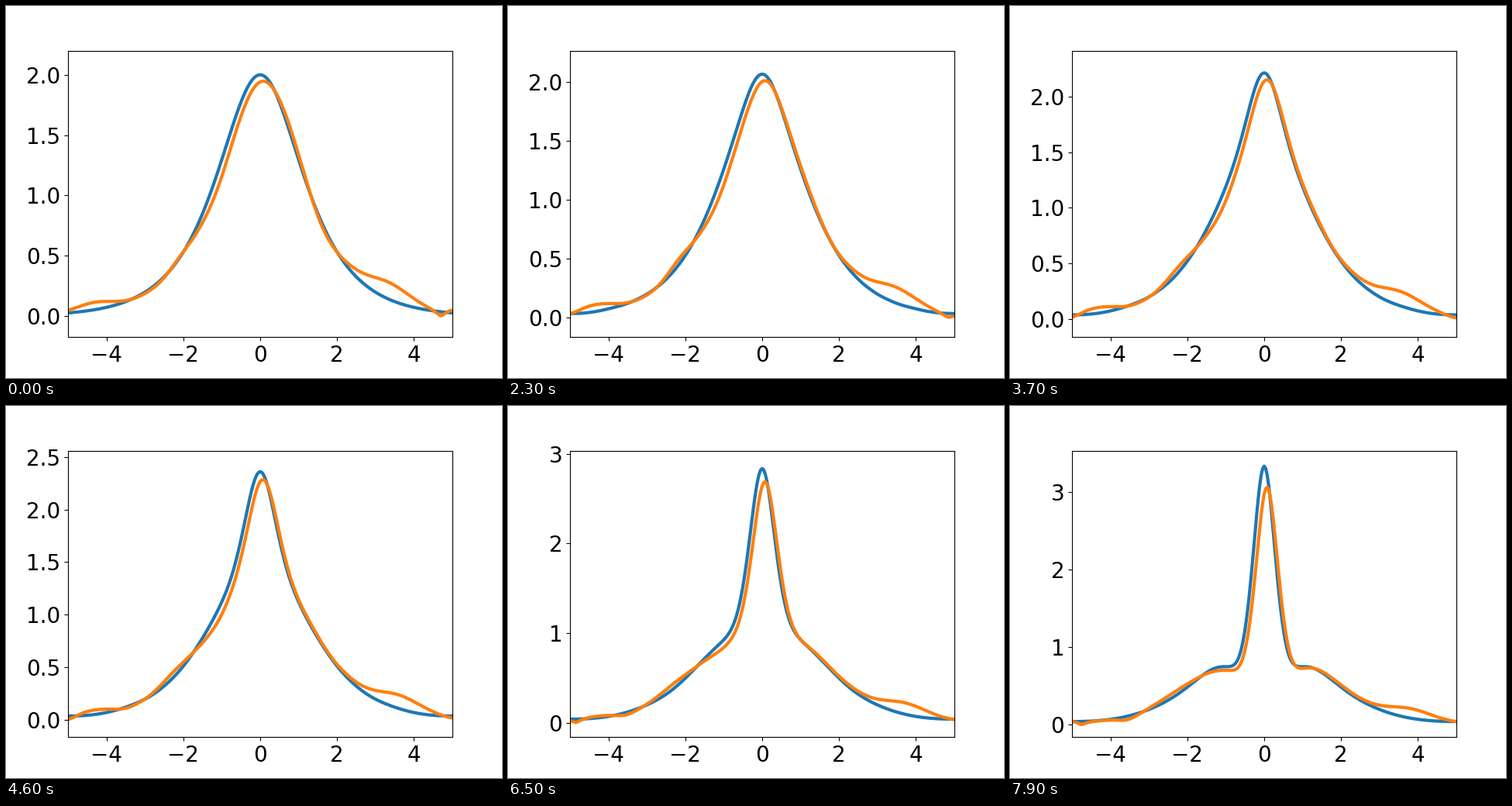
Recreate the animation shown at these times as a matplotlib script. Size 640 px wide and 480 px high, loop 8000 ms.

```python
import numpy as np
import matplotlib.pyplot as plt
from matplotlib.animation import FuncAnimation

plt.rcParams["font.family"] = "DejaVu Sans"
plt.rcParams["font.size"] = 20

FRAMES, HOLD = 80, 4
LAST = FRAMES - 1 - HOLD
DT = np.pi / 400
N = 256
x = np.linspace(-5, 5, N + 1)[:-1]


def simulate(steps, sub=10):
    """|h| for i h_t + h_xx / 2 + |h|^2 h = 0, periodic, by split steps."""
    dt = DT / sub
    wave = 2 * np.pi * np.fft.fftfreq(N, 10 / N)
    drift = np.exp(-0.5j * wave**2 * dt)
    h = 2 / np.cosh(x) + 0j
    rows = [np.abs(h)]
    for _ in range(steps):
        for _ in range(sub):
            h = h * np.exp(0.5j * dt * np.abs(h) ** 2)
            h = np.fft.ifft(drift * np.fft.fft(h))
            h = h * np.exp(0.5j * dt * np.abs(h) ** 2)
        rows.append(np.abs(h))
    return np.array(rows)


def breather(x, t):
    """Closed form of the two-soliton amplitude on the open line."""
    top = np.cosh(3 * x) + 3 * np.exp(4j * t) * np.cosh(x)
    return 4 * np.abs(top) / (np.cosh(4 * x) + 4 * np.cosh(2 * x) + 3 * np.cos(4 * t))


def bump(centre, width, height):
    return height * np.exp(-(((x - centre) / width) ** 2))


def fitted(step):
    """Imperfect fit: the wave shifted right, flattened, with drifting ripples."""
    p = step / LAST
    early = np.exp(-12 * p)
    y = breather(x - 0.07, step * DT)
    y *= 1 - 0.076 * p**3 * np.exp(-2 * x**2)
    y -= (0.055 - 0.035 * p**2) * np.exp(-((x / 1.4) ** 4))

    # left tail and flank
    y += bump(-5, 0.3, -0.065 * p)
    y += bump(-4.3, 0.7, 0.065 * (1 - p**2))
    y += bump(-3.55, 0.35, -0.045 * p**2)
    y += bump(-2.1 - 0.2 * p, 0.4 + 0.35 * p, 0.08 - 0.04 * early)
    y += bump(-1.1, 0.4, -0.03)

    # right flank and tail
    y += bump(0.75, 0.4, 0.03 * early)
    y += bump(1.5, 0.35, -0.03 * early)
    y += bump(1.8, 0.45, -0.05 * (1 - p))
    y += bump(3.35 + 0.45 * p, 0.8, 0.13 - 0.015 * p)
    y += bump(5, 0.4, -0.08 * (1 - p) ** 2)
    return np.abs(y)


exact = simulate(LAST)

fig, ax = plt.subplots(figsize=(6.4, 4.8), dpi=100)
blue, = ax.plot(x, exact[0], color="#1f77b4", lw=3)
orange, = ax.plot(x, fitted(0), color="#ff7f0e", lw=3)
ax.set_xlim(-5, 5)


def draw(i):
    k = max(0, i - HOLD)
    blue.set_ydata(exact[k])
    orange.set_ydata(fitted(k))
    ax.set_ylim(exact[k].min() - 0.2, exact[k].max() + 0.2)
    return blue, orange


anim = FuncAnimation(fig, draw, frames=FRAMES, interval=100, repeat=True, blit=False)
plt.show()
```
